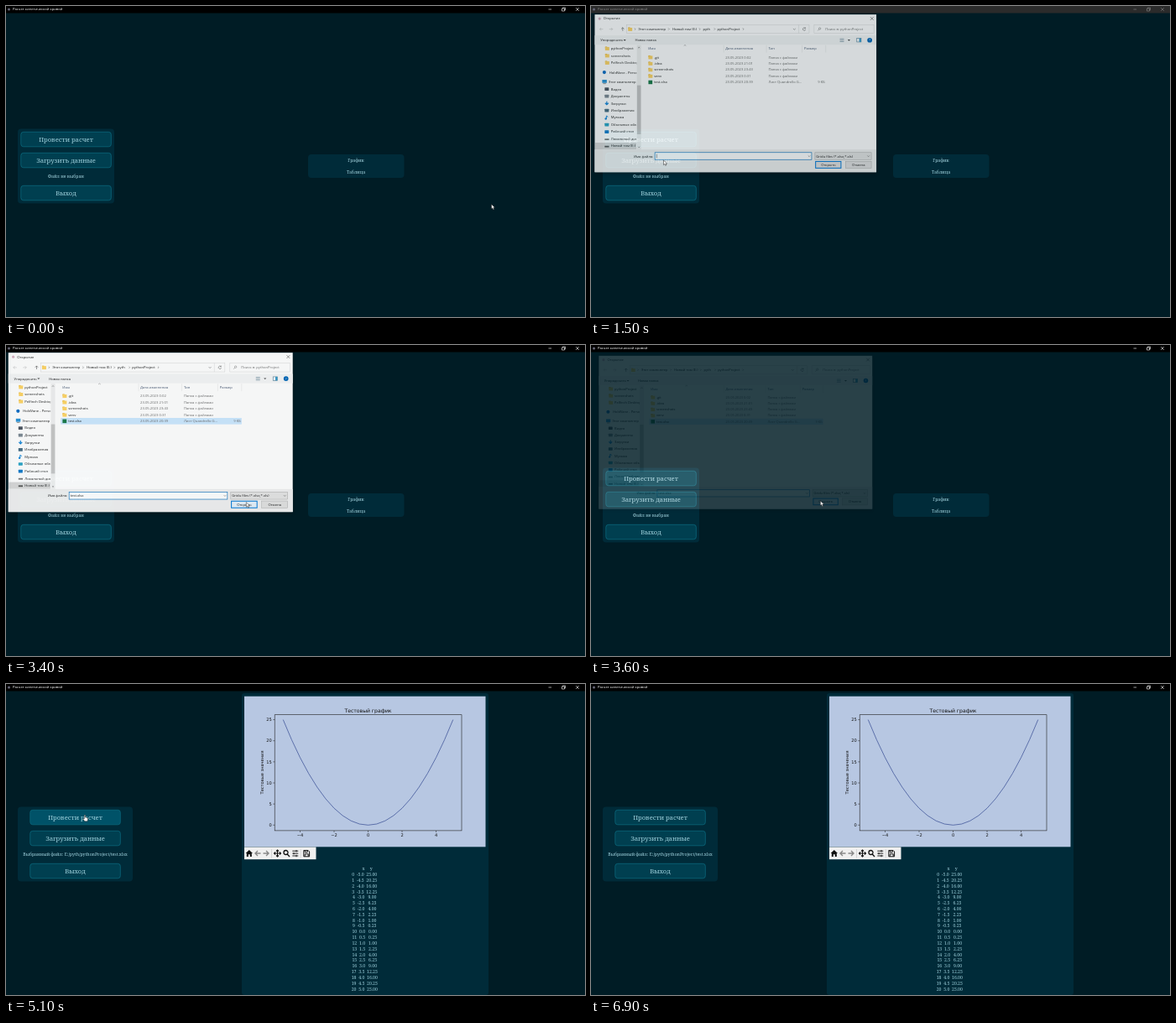
Animation of 690 by 371 pixels, one loop 7400 ms. Source, as an HTML page:

```html
<!DOCTYPE html>
<html lang="ru">
<head>
<meta charset="utf-8">
<title>Расчет кинетической кривой</title>
<style>
html, body { margin: 0; width: 100%; height: 100%; overflow: hidden; background: #001c25; }
svg { display: block; width: 690px; height: 371px; }
text { white-space: pre; }
.serif { font-family: "Noto Serif", serif; fill: #a5d5e0; }
.ui { font-family: "Open Sans", sans-serif; }
.plot { font-family: "DejaVu Sans", sans-serif; fill: #111; }
</style>
</head>
<body>
<svg id="stage" viewBox="0 0 690 371"></svg>
<script>
const LOOP = 7400, STEP = 100;

const rect = (x, y, w, h, fill, extra = '') =>
  `<rect x="${x}" y="${y}" width="${w}" height="${h}" fill="${fill}" ${extra}/>`;
const path = (d, stroke, width = 0.6, extra = '') =>
  `<path d="${d}" fill="none" stroke="${stroke}" stroke-width="${width}" ${extra}/>`;
// y is the optical middle of the line
const text = (cls, x, y, size, s, extra = '') =>
  `<text class="${cls}" x="${x}" y="${y + size * 0.35}" font-size="${size}" ${extra}>${s}</text>`;
const middle = 'text-anchor="middle"', end = 'text-anchor="end"';
const serif = (x, y, size, s) => text('serif', x, y, size, s, middle);
const ui = (x, y, s, fill = '#222', extra = '') =>
  text('ui', x, y, 4.2, s, `fill="${fill}" ${extra}`);
const group = (id, body, extra = '') => `<g id="${id}" ${extra}>${body}</g>`;

function titleBar(active) {
  const ink = active ? '#fff' : '#858585';
  return rect(0, 0, 690, 8.5, active ? '#000' : '#2b2b2b') +
    `<circle cx="3.5" cy="4" r="1.5" fill="#667"/>` +
    ui(8, 4, 'Расчет кинетической кривой', ink) +
    path('M646.5 4h3.6M662.5 3h3v3h-3zM663.5 3v-1h3v3h-1M679.2 2.2l3.6 3.6m0-3.6l-3.6 3.6', ink);
}

function button(id, x, y, label) {
  return rect(x, y, 107.5, 17.5, '#003f50', `id="${id}" rx="3" stroke="#0b687c" stroke-width=".8"`) +
    serif(x + 53.7, y + 8.6, 7.65, label);
}

function menu(name, width, caption) {
  const mid = 14 + width / 2, left = mid - 53.7;
  return rect(14, 146.5, width, 89, '#002b39', 'rx="4"') +
    button(name + 'Run', left, 150.3, 'Провести расчет') +
    button(name + 'Load', left, 175.3, 'Загрузить данные') +
    serif(mid, 203.6, 5.2, caption) +
    button(name + 'Exit', left, 214.3, 'Выход');
}

const emptyResults = x => rect(x, 177, 114.5, 28, '#002b39', 'rx="4"') +
  serif(x + 57, 184, 5.2, 'График') + serif(x + 57, 198, 5.2, 'Таблица');

const samples = Array.from({ length: 21 }, (_, i) => i / 2 - 5);

function chart() {
  const px = v => 431.5 + 20.25 * v, py = v => 168.3 - 5.03 * v;
  let out = rect(284, 14.7, 287.5, 179.6, '#b7c7e2') +
    rect(320.2, 36.7, 222.8, 138.2, 'none', 'stroke="#222" stroke-width=".6"');
  for (const v of [-4, -2, 0, 2, 4])
    out += path(`M${px(v)} 175v1.8`, '#222') +
      text('plot', px(v), 180.7, 5.1, String(v).replace('-', '−'), middle);
  for (const v of [0, 5, 10, 15, 20, 25])
    out += path(`M320.2 ${py(v)}h-1.8`, '#222') + text('plot', 316.8, py(v), 5.1, v, end);
  return out + text('plot', 431.5, 31.4, 6.1, 'Тестовый график', middle) +
    text('plot', 0, 0, 5.1, 'Тестовые значения', `${middle} transform="translate(305.3 105.5) rotate(-90)"`) +
    path('M' + samples.map(v => `${px(v)} ${py(v * v)}`).join('L'), '#344a91', 0.7);
}

function toolbar() {
  const ink = '#111', arrow = 'M303.5 202h-6.5m3-3l-3 3l3 3';
  return rect(284, 194.5, 85.5, 14.7, '#f0f0f0') +
    `<path d="M289.8 198l4.2 4h-1.2v4h-2v-2.7h-2v2.7h-2v-4h-1.2z" fill="${ink}"/>` +
    path(arrow, '#888', 1.4) + path(arrow, '#888', 1.4, 'transform="translate(610 0) scale(-1 1)"') +
    path('M316.5 197v10.5M351.2 197v10.5', '#bbb', 0.5) +
    path('M319.5 202h8m-4-4v8M321 200.5l-1.5 1.5l1.5 1.5M326 200.5l1.5 1.5l-1.5 1.5M322 199.5l1.5-1.5l1.5 1.5M322 204.5l1.5 1.5l1.5-1.5', ink, 1.1) +
    path('M336 201a2.5 2.5 0 1 0-5 0a2.5 2.5 0 1 0 5 0M335.2 203l2.8 3', ink, 1.3) +
    path('M341.3 199.2h7m-7 2.9h7m-7 2.9h7M346 198v2.4M343 201v2.4M346 203.8v2.4', ink, 0.9) +
    path('M354.8 198.5h5.3l1.5 1.5v5.8h-6.8zM356.2 198.5v2.2h3v-2.2M356.2 205.8v-3h4v3', ink, 1);
}

function table() {
  const rows = samples.map((v, i) => {
    const line = `${String(i).padEnd(2)} ${v.toFixed(1).padStart(4)}  ${(v * v).toFixed(2).padStart(5)}`;
    return serif(427.3, 227.2 + i * 6.83, 5.2, line.trimEnd());
  });
  return serif(426, 220.2, 5.2, 'x') + serif(435.2, 220.2, 5.2, 'y') + rows.join('');
}

const results = () => rect(281, 11, 294, 360, '#002b39', 'rx="3"') + chart() + toolbar() + table();

const folder = (x, y) => rect(x, y - 2.2, 2.4, 2, '#e8b73e') + rect(x, y - 1.7, 5, 4, '#ffd667');

function sidebar() {
  const icon = (y, color) => rect(14.5, y - 1.8, 5, 3.7, color, 'rx=".5"');
  let out = rect(3, 163.7, 50, 8.3, '#d9d9d9');
  ['pythonProject', 'screenshots', 'Pelfinch Desktop'].forEach((s, i) => {
    const y = 50 + i * 8.6;
    out += folder(15, y) + ui(22, y, s);
  });
  out += '<circle cx="14" cy="78.8" r="2.1" fill="#0f6fc6"/>' + ui(20, 78.8, 'HoldVane - Personal') +
    rect(11.5, 87.8, 5.5, 3.8, '#2c94d6') + path('M12.5 92.5h3.5', '#555') + ui(19, 90.2, 'Этот компьютер');
  const places = [
    ['Видео', '#4d5560'], ['Документы', '#7d8a94'], ['Загрузки', '#1687d9'], ['Изображения', '#496f85'],
    ['Музыка', '#1689dc'], ['Объемные объекты', '#2ba6c8'], ['Рабочий стол', '#147bc9'],
    ['Локальный диск (C:)', '#777'], ['Новый том (E:)', '#555'],
  ];
  places.forEach(([s, color], i) => {
    const y = 99 + i * 8.6;
    out += (i === 2 ? path(`M17 ${y - 2.3}v4m-2-2l2 2l2-2`, color, 1.2) :
      i === 4 ? path(`M16.5 ${y + 1.5}v-3.5l2 1.2`, color, 1) + `<circle cx="15.8" cy="${y + 1.4}" r="1.2" fill="${color}"/>` :
      i > 6 ? rect(14.5, y - 0.3, 5.2, 1.8, color) : icon(y, color)) + ui(22, y, s);
  });
  return `<g clip-path="url(#side)">${out}</g>` + rect(53.3, 46, 5, 126, '#f0f0f0') +
    rect(53.5, 94.5, 4.6, 59, '#c7c7c7') + path('M54.8 49.5l1-1l1 1M54.8 168.5l1 1l1-1', '#555');
}

function fileList() {
  const files = [
    ['.git', '0:02'], ['.idea', '21:01'], ['screenshots', '23:43'], ['venv', '0:31'], ['test.xlsx', '20:39'],
  ];
  let out = ui(67, 50, 'Имя', '#4b5b75') + ui(160, 50, 'Дата изменения', '#4b5b75') +
    ui(212, 50, 'Тип', '#4b5b75') + ui(255, 50, 'Размер', '#4b5b75') +
    path('M158 46v9M209.5 46v9M252.5 46v9M281 46v9', '#e2e2e2', 0.5) + path('M110 46.8l1.3-1l1.3 1', '#777', 0.5) +
    rect(65, 87, 216, 7.6, '#e5f3ff', 'id="row"');
  files.forEach(([name, time], i) => {
    const y = 60.6 + i * 7.55, sheet = i === 4;
    out += (sheet ? rect(67.2, y - 2.3, 4.8, 4.6, '#1d7c4b') : folder(67.2, y)) + ui(74, y, name) +
      ui(160, y, '23.05.2023 ' + time, '#6d6d6d') +
      ui(212, y, sheet ? 'Лист Quandrello G...' : 'Папка с файлами', '#6d6d6d');
  });
  return out + ui(280, 90.8, '9 КБ', '#6d6d6d', end);
}

function dialog() {
  const crumbs = [[55, 'Этот компьютер'], [96, 'Новый том (E:)'], [133, 'pyth'], [150.3, 'pythonProject']];
  const frame = 'stroke="#d9d9d9" stroke-width=".5"';
  return rect(2.5, 9, 339.5, 190.3, '#fff', 'filter="url(#shadow)"') +
    '<circle cx="8.3" cy="14" r="1.6" fill="#d9b3c4"/>' + ui(13, 14, 'Открытие') +
    path('M334.8 12l3.8 3.8m0-3.8l-3.8 3.8', '#333', 0.5) +
    path('M12.5 26.7h-4m1.7-1.7l-1.7 1.7l1.7 1.7M20 26.7h4m-1.7-1.7l1.7 1.7l-1.7 1.7', '#c8c8c8') +
    path('M36.2 28.8v-4m-1.7 1.7l1.7-1.7l1.7 1.7', '#555') +
    rect(41, 21.3, 220, 10.6, '#fff', frame) + path('M248.5 21.3v10.6', '#d9d9d9', 0.5) + folder(42.7, 26.7) +
    crumbs.map(([x, s]) => ui(x, 26.6, s)).join('') +
    path([50.5, 91.2, 128.5, 146.5, 181].map(x => `M${x} 25.5l1.1 1.1l-1.1 1.1`).join(''), '#555', 0.5) +
    path('M241.8 26l1.4 1.4l1.4-1.4M256.3 25.5a1.7 1.7 0 1 0 .4 1.6M256.5 24.5v1.3h-1.3', '#555', 0.5) +
    rect(267, 21.3, 72, 10.6, '#fff', frame) +
    path('M275 26a1.2 1.2 0 1 0-2.4 0a1.2 1.2 0 1 0 2.4 0M272.9 26.9l-1.5 1.7', '#777', 0.5) +
    ui(280.5, 26.6, 'Поиск в: pythonProject', '#777') +
    rect(2.5, 34.3, 339.5, 11.2, '#f5f6f7') + ui(9.3, 40, 'Упорядочить') + ui(51, 40, 'Новая папка') +
    '<path d="M37 39.3h3.2l-1.6 1.7zM307.4 39.3h3.2l-1.6 1.7z" fill="#444"/>' +
    path('M298 38.4h5m-5 1.7h5m-5 1.7h5', '#8aa0ae', 0.8) +
    rect(318.5, 37.8, 5.2, 4.4, '#fff', 'stroke="#4b7890" stroke-width=".6"') + rect(321.3, 37.8, 2.4, 4.4, '#3b9dcc') +
    '<circle cx="334" cy="40" r="2.9" fill="#0067b8"/>' + ui(334, 40, '?', '#fff', middle) +
    sidebar() + fileList() +
    rect(2.5, 172, 339.5, 27.3, '#f0f0f0') + ui(73, 180, 'Имя файла:', '#222', end) +
    rect(75, 175.6, 189, 8.6, '#fff', 'stroke="#1b78bf" stroke-width=".7"') +
    path('M77.3 177.5v4.8', '#222', 0.4, 'id="caret"') + group('fileName', ui(76.5, 180, 'test.xlsx')) +
    rect(268, 175.6, 68, 8.6, '#e4e4e4', 'stroke="#aaa" stroke-width=".5"') + ui(269.5, 180, 'Gridu files (*.xlsx;*.xls)') +
    path('M259.8 179.3l1.3 1.3l1.3-1.3M331.2 179.3l1.3 1.3l1.3-1.3', '#555', 0.5) +
    rect(268.8, 186.4, 30.6, 8, '#e1e1e1', 'id="open" stroke="#0078d7" stroke-width="1"') + ui(284.2, 190.4, 'Открыть', '#222', middle) +
    rect(305, 186.2, 31, 8.4, '#e1e1e1', 'stroke="#adadad" stroke-width=".5"') + ui(320.5, 190.4, 'Отмена', '#222', middle);
}

const outline = 'fill="#fff" stroke="#111" stroke-width=".45" stroke-linejoin="round"';
const stage = document.getElementById('stage');
stage.innerHTML = `<defs>
  <clipPath id="side"><rect x="2.5" y="46" width="50.5" height="126"/></clipPath>
  <filter id="shadow" x="-5%" y="-5%" width="110%" height="112%"><feDropShadow dx="0" dy="2" stdDeviation="2" flood-opacity=".35"/></filter>
  </defs>` + rect(0, 0, 690, 371, '#001c25') +
  group('barOn', titleBar(true)) + group('barOff', titleBar(false)) +
  group('before', menu('a', 115, 'Файл не выбран')) +
  group('after', menu('b', 137, 'Выбранный файл: E:/pyth/pythonProject/test.xlsx')) +
  group('emptyA', emptyResults(360)) + group('emptyB', emptyResults(370.5)) + group('results', results()) +
  group('dialog', dialog()) +
  group('cursor',
    `<path id="arrow" d="M0 0v5.6l1.3-1.2l.9 2l1-.45l-.9-1.9h1.8z" ${outline}/>` +
    `<path id="hand" d="M-.7 .5q.7-.9 1.3 0v2.6l2.4.6q.8.3.6 1.2l-.5 2.9h-3.3l-2-2.8q.2-1 1.5-.1z" ${outline}/>`);

const parts = {};
stage.querySelectorAll('[id]').forEach(node => parts[node.id] = node);
const show = (id, on) => parts[id].style.display = on ? '' : 'none';
const fill = (id, color) => parts[id].setAttribute('fill', color);
const clamp = v => Math.max(0, Math.min(1, v));

// cursor stops: time, x, y
const stops = [
  [200, 578.5, 236.5], [1000, 86.5, 184], [2000, 86.5, 184], [2300, 96.3, 91.5], [2500, 96.3, 91.5],
  [3300, 286.3, 187.7], [3500, 286.3, 187.7], [4100, 112, 165], [4400, 94, 156], [5800, 94, 156],
  [6600, 200, 161], [6900, 408, 374],
];

function cursorAt(t) {
  const i = stops.findIndex(s => s[0] >= t);
  if (i < 0) return stops[stops.length - 1].slice(1);
  if (i === 0) return stops[0].slice(1);
  const [t0, x0, y0] = stops[i - 1], [t1, x1, y1] = stops[i];
  const p = (t - t0) / (t1 - t0), e = p * p * (3 - 2 * p);
  return [x0 + (x1 - x0) * e, y0 + (y1 - y0) * e];
}

function draw(t) {
  const [x, y] = cursorAt(t);
  const modal = t >= 1100 && t < 3400, chosen = t >= 3700, done = t >= 5100, picked = t >= 2400;
  show('barOn', !modal);
  show('barOff', modal);
  show('before', !chosen);
  show('after', chosen);
  show('emptyA', !chosen);
  show('emptyB', chosen && !done);
  show('results', done);

  const opening = t < 3000;
  const opacity = opening ? clamp((t - 1250) / 300) : 1 - clamp((t - 3390) / 250);
  const scale = 1 - (opening ? 0.07 : 0.048) * (1 - opacity);
  show('dialog', opacity > 0);
  parts.dialog.setAttribute('opacity', opacity);
  parts.dialog.setAttribute('transform', `translate(172.2 104.1) scale(${scale}) translate(-172.2 -104.1)`);
  show('fileName', picked);
  show('caret', !picked);
  show('row', t >= 2200);
  fill('row', picked ? '#cce8ff' : '#e5f3ff');
  fill('open', x > 268 && y > 186 ? '#e5f1fb' : '#e1e1e1');

  let pointing = false;
  for (const [id, top] of [['Run', 150.3], ['Load', 175.3], ['Exit', 214.3]]) {
    const inY = y >= top && y <= top + 17.5;
    const hoverA = !modal && !chosen && inY && x >= 18 && x <= 126;
    const hoverB = chosen && inY && x >= 29 && x <= 137;
    fill('a' + id, hoverA ? '#005268' : '#003f50');
    fill('b' + id, hoverB ? '#005268' : '#003f50');
    pointing = pointing || hoverA || hoverB;
  }
  show('arrow', !pointing);
  show('hand', pointing);
  parts.cursor.setAttribute('transform', `translate(${x} ${y})`);
}

function tick() {
  draw(Math.floor((performance.now() % LOOP) / STEP) * STEP);
  requestAnimationFrame(tick);
}
tick();
</script>
</body>
</html>
```
